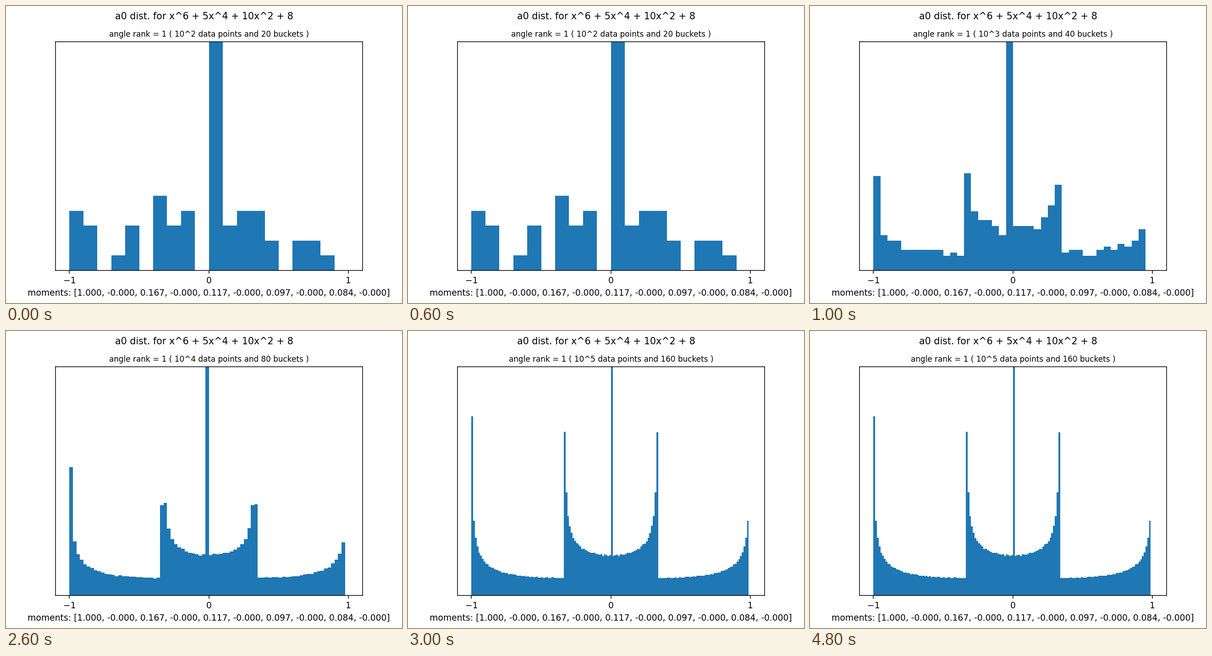
A matplotlib script that plays this animation: 864x648 px, repeating every 6000 ms.

```python
import numpy as np
import matplotlib.pyplot as plt
from matplotlib.animation import FuncAnimation

plt.rcParams["font.family"] = "DejaVu Sans"

STAGES = 4
HOLD_STEPS = 6  # the last stage stays for the remaining seconds
MOMENTS = "1.000, -0.000, 0.167, -0.000, 0.117, -0.000, 0.097, -0.000, 0.084, -0.000"


def normalised_traces(count):
    """Normalised Frobenius traces of x^6 + 5x^4 + 10x^2 + 8 for n = 1..count.

    Odd powers vanish; even powers n = 2m depend on one angle only.
    """
    m = np.arange(1, count // 2 + 1)
    even = (-1.0) ** m * (1 + 2 * np.cos(m * np.arccos(0.75))) / 3
    return np.concatenate([np.zeros(count - len(even)), even])


fig, ax = plt.subplots(figsize=(6.4, 4.8), dpi=135)
fig.suptitle("a0 dist. for x^6 + 5x^4 + 10x^2 + 8", fontsize=11)


def draw(step):
    stage = min(step, STAGES - 1)
    power, buckets = stage + 2, 20 * 2 ** stage
    ax.clear()
    ax.hist(normalised_traces(10 ** power),
            bins=np.arange(-1, 1, 2 / buckets), density=True, color="#1f77b4")
    ax.set(xlim=(-1.1, 1.1), ylim=(0, 1.6), xticks=[-1, 0, 1], yticks=[])
    ax.set_xticklabels(["\u22121", "0", "1"])
    ax.set_xlabel(f"moments: [{MOMENTS}]", fontsize=10)
    ax.set_title(f"angle rank = 1 ( 10^{power} data points and {buckets} buckets )",
                 fontsize=9)
    return []


anim = FuncAnimation(fig, draw, frames=HOLD_STEPS, interval=1000,
                     init_func=lambda: draw(0), repeat=True, repeat_delay=0)
plt.show()
```
